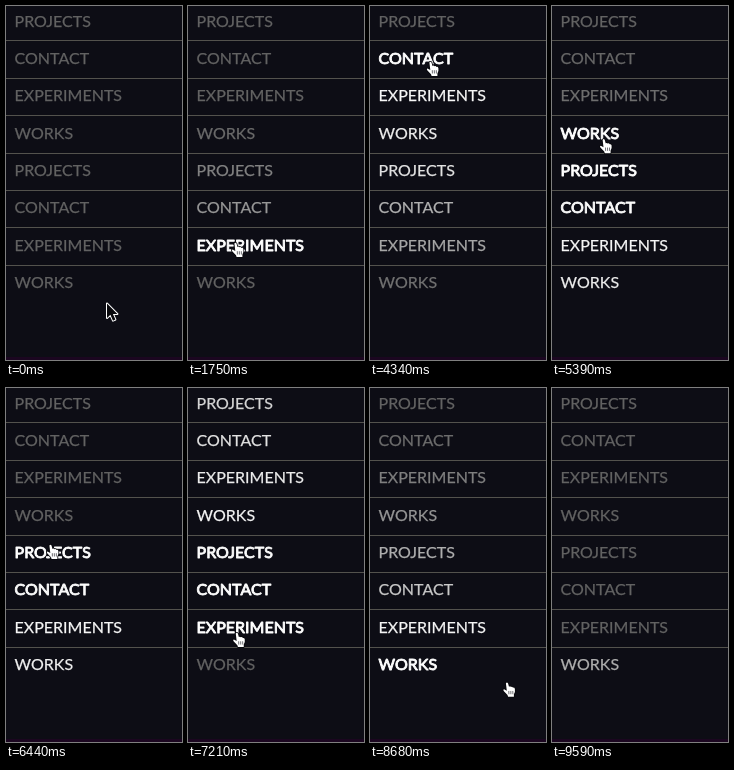
An HTML page with a canvas for the animation above (9.66 s loop, 176 by 354 pixels).

```html
<!DOCTYPE html>
<html lang="en">
<head>
<meta charset="utf-8">
<title>Menu hover</title>
<style>
  html, body { margin: 0; width: 100%; height: 100%; overflow: hidden; background: #0d0d15; }
  canvas { display: block; width: 176px; height: 354px; }
</style>
</head>
<body>
<canvas id="stage"></canvas>
<script>
const W = 176, H = 354, LOOP = 9660, STEP = 70;
const ROW = 37.4, ATTACK = 20, DECAY = 550;
const words = ['PROJECTS', 'CONTACT', 'EXPERIMENTS', 'WORKS'];
const labels = [...words, ...words];

// Pointer path: time, x, y
const path = `0 100 297.5|70 100 297.5|140 112 303|210 104 300|490 104 300
700 60 150|850 50 14|1000 46 14|1200 46 95|1280 46 147|1360 46 184|1420 47 222
1600 48 236|1800 48 236|1900 48 246|2100 50 14|2330 50 14|2470 52 262
2700 52 266|2860 53 259.5|2870 53 252|2950 50 14|3050 48 95|3120 48 130
3710 48 130|3800 50 268|3900 52 259|4040 54 222|4070 56 184|4190 58 147
4270 60 72|4320 61 55|4650 61 55|4850 56 14|5100 55 283|5250 55 283
5500 50 14|5670 50 14|5800 50 150|5950 60 280|6050 62 301|6150 58 290
6340 50 259|6390 47 184|6420 45 156|6600 45 156|6800 46 3|7000 46 3
7250 50 290|7430 50 259|7560 48 222|7770 48 184|7800 46 147|7840 46 109
7890 45 72|7920 44 35|7960 44 12|8120 44 12|8480 50 231|8540 60 231
8620 100 275|8700 150 300|8760 190 302|9220 185 285|9300 140 292
9500 150 370|9660 150 370`
  .split(/[|\n]/).map(p => p.trim().split(' ').map(Number));

const canvas = document.getElementById('stage');
const ctx = canvas.getContext('2d');
const dpr = window.devicePixelRatio || 1;
canvas.width = W * dpr;
canvas.height = H * dpr;
ctx.scale(dpr, dpr);

const clamp = v => Math.max(0, Math.min(1, v));
const smooth = v => v * v * (3 - 2 * v);

function pointer(t) {
  const i = Math.max(1, path.findIndex(p => p[0] >= t));
  const [a, b] = [path[i - 1], path[i]];
  const k = clamp((t - a[0]) / (b[0] - a[0]));
  return { x: a[1] + (b[1] - a[1]) * k, y: a[2] + (b[2] - a[2]) * k };
}

function rowAt({ x, y }) {
  const row = Math.floor((y + 2.6) / ROW);
  return x < W && row >= 0 && row < labels.length ? row : -1;
}

// Each row lights up quickly under the pointer and fades slowly after it.
function glow(t) {
  const levels = labels.map(() => 0);
  const dt = 5;
  for (let s = Math.max(0, t - 1600); s <= t; s += dt) {
    const hover = rowAt(pointer(s));
    levels.forEach((v, i) => {
      levels[i] = clamp(v + (i === hover ? dt / ATTACK : -dt / DECAY));
    });
  }
  return levels;
}

function drawShape(x, y, d, fill, stroke, width) {
  const shape = new Path2D(d);
  ctx.save();
  ctx.translate(x, y);
  ctx.lineJoin = 'round';
  ctx.lineWidth = width;
  ctx.strokeStyle = stroke;
  ctx.fillStyle = fill;
  ctx.stroke(shape);
  ctx.fill(shape);
  ctx.restore();
}

function drawArrow(x, y) {
  drawShape(x + 1, y, 'M0 0V14.5L3.4 11.3L6 17.2L8.4 16.1L5.9 10.4H10.4Z', '#08080c', '#fff', 2);
}

function drawHand(x, y) {
  drawShape(x - 5, y,
    'M3.4 1.4Q4.5 0 5.5 1.5L6.5 5Q7.6 4 8.5 5.2Q9.8 4.6 10.5 5.9' +
    'Q12 5.5 12.4 7.2Q12.9 10 11.4 12.4V15H5.6L5 13.2L1.2 9.2' +
    'Q.2 7.7 1.6 7.5L4.3 9Z', '#fff', '#08080c', 1.6);
  ctx.strokeStyle = '#33333a';
  ctx.lineWidth = 0.7;
  ctx.beginPath();
  for (let i = 0; i < 3; i++) {
    ctx.moveTo(x + 1.3 + i * 2, y + 9.2);
    ctx.lineTo(x + 1.4 + i * 2, y + 12.5);
  }
  ctx.stroke();
}

function draw(t) {
  ctx.fillStyle = '#0d0d15';
  ctx.fillRect(0, 0, W, H);
  ctx.fillStyle = '#1b0620';
  ctx.fillRect(0, 351, W, 3);

  ctx.font = '16px Lato, "Open Sans", sans-serif';
  ctx.textBaseline = 'alphabetic';
  ctx.lineJoin = 'round';
  glow(t).forEach((level, i) => {
    if (i) {
      ctx.fillStyle = '#53524d';
      ctx.fillRect(0, Math.round(i * ROW - 3), W, 1);
    }
    const shade = Math.round(98 + 157 * smooth(level));
    const y = 20.8 + i * 37.3;
    ctx.fillStyle = ctx.strokeStyle = `rgb(${shade},${shade},${shade})`;
    ctx.lineWidth = level > 0.9 ? 0.9 : 0.25;
    ctx.fillText(labels[i], 8.6, y);
    ctx.strokeText(labels[i], 8.6, y);
  });

  const p = pointer(t);
  (rowAt(p) < 0 ? drawArrow : drawHand)(p.x, p.y);
}

const start = performance.now();
function tick() {
  const t = (performance.now() - start) % LOOP;
  draw(Math.floor(t / STEP) * STEP);
  requestAnimationFrame(tick);
}
tick();
</script>
</body>
</html>
```
